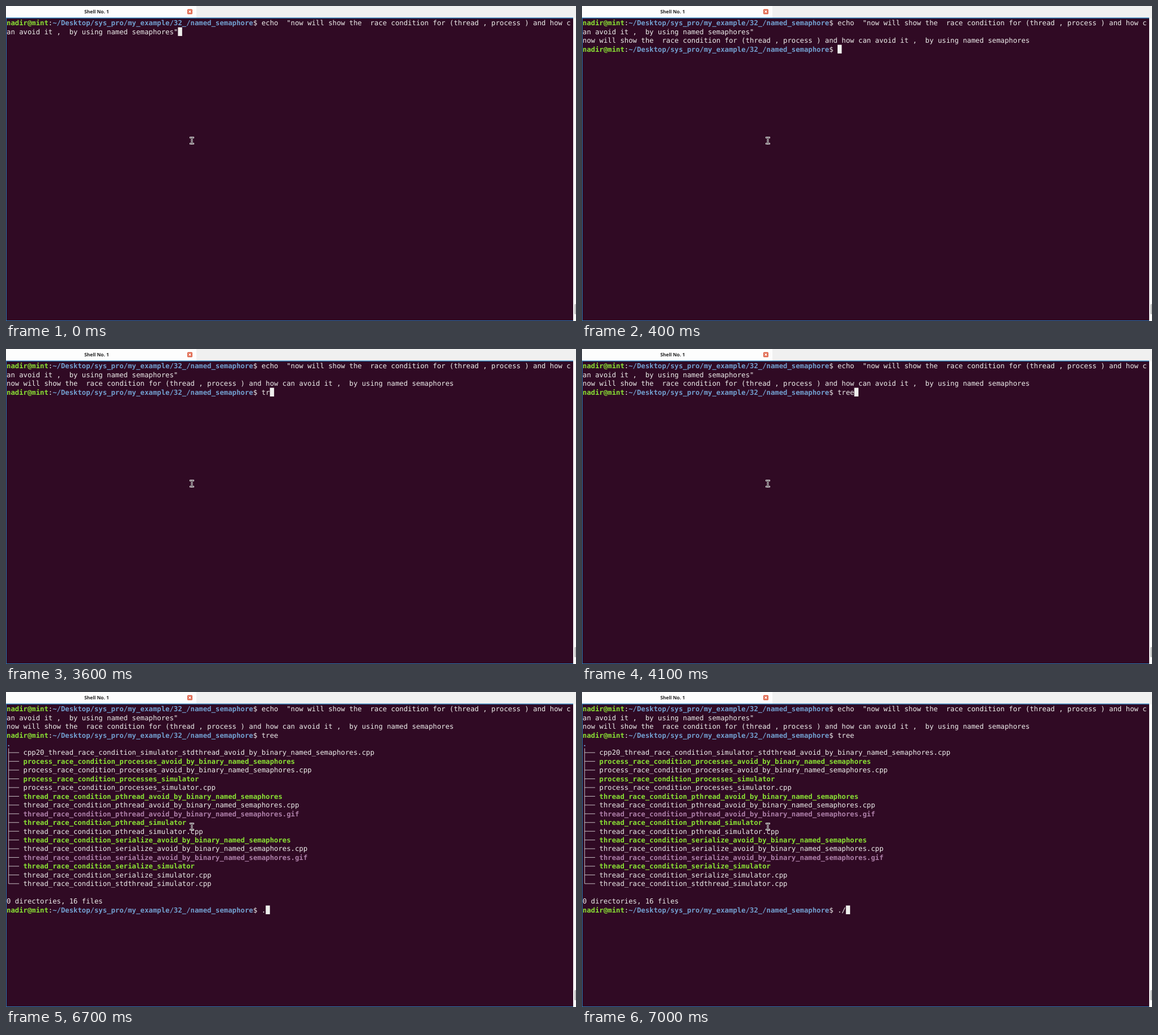
These frames come from a looping animation (1006x557 px, 8 s). An HTML page:

```html
<!DOCTYPE html>
<html lang="en">
<head>
<meta charset="utf-8">
<title>Shell No. 1</title>
<style>
  html, body { margin: 0; width: 100%; height: 100%; overflow: hidden; background: #f0f0f0; }
  svg { display: block; width: 1006px; height: 557px; }
  text { white-space: pre; text-rendering: geometricPrecision; }
  #term { font: 12.253px "DejaVu Sans Mono", monospace; fill: #eeeeec; }
  .g, .b, .m { font-weight: bold; }
  .g { fill: #8ae234; }
  .b { fill: #729fcf; }
  .m { fill: #ad7fa8; }
  .tab { font: bold 8.4px "Noto Sans", "Open Sans", sans-serif; fill: #222; }
</style>
</head>
<body>
<svg viewBox="0 0 1006 557">
  <rect width="1006" height="557" fill="#f0f0f0"/>
  <rect width="336" height="21" fill="#fdfdfd"/>
  <text class="tab" x="160" y="13" text-anchor="middle">Shell No. 1</text>
  <rect x="320" y="5.5" width="9" height="9" rx="1.5" fill="#e0664c"/>
  <path d="M322.5 8l4 4m0-4l-4 4" stroke="#fff" stroke-width="1.2"/>
  <rect y="20.5" width="1001" height="536.5" fill="#2b78b0"/>
  <rect x="1" y="22" width="1000" height="534" fill="#300a24"/>
  <rect x="1001" y="22" width="5" height="535" fill="#fafafa"/>
  <rect x="1003" y="527" width="4" height="18" rx="1.5" fill="#c4c4c4"/>
  <g id="term"></g>
  <rect id="caret" width="7.4" height="15.4" fill="#eeeeec"/>
  <g fill="none" stroke-linecap="square">
    <path d="M325.5 232.7h1.5l1 1 1-1h1.5M328 233.7v8.6M325.5 243.3h1.5l1-1 1 1h1.5" stroke="#f4f4f4" stroke-width="2.8"/>
    <path d="M325.5 232.7h1.5l1 1 1-1h1.5M328 233.7v8.6M325.5 243.3h1.5l1-1 1 1h1.5" stroke="#1c1018" stroke-width="1"/>
  </g>
</svg>
<script>
const LOOP = 8000, CELL = 7.377, LINE = 15.45, LEFT = 1, TOP = 22.2;
const term = document.getElementById('term');
const caret = document.getElementById('caret');
const colX = col => LEFT + col * CELL;
const rowY = row => TOP + row * LINE;
const span = (cls, s) => `<tspan class="${cls}">${s}</tspan>`;
const text = (row, s, col = 0) => `<text x="${colX(col)}" y="${rowY(row) + 12}">${s}</text>`;

const PROMPT = span('g', 'nadir@mint') + ':' +
  span('b', '~/Desktop/sys_pro/my_example/32_/named_semaphore') + '$ ';
const PROMPT_COLS = 61;
const RACE = 'thread_race_condition_', PROC = 'process_race_condition_processes_';
const AVOID = 'avoid_by_binary_named_semaphores';
const FILES = [
  ['', 'cpp20_thread_race_condition_simulator_stdthread_' + AVOID + '.cpp'],
  ['g', PROC + AVOID],
  ['', PROC + AVOID + '.cpp'],
  ['g', PROC + 'simulator'],
  ['', PROC + 'simulator.cpp'],
  ...['pthread_', 'serialize_'].flatMap(kind => [
    ['g', RACE + kind + AVOID],
    ['', RACE + kind + AVOID + '.cpp'],
    ['m', RACE + kind + AVOID + '.gif'],
    ['g', RACE + kind + 'simulator'],
    ['', RACE + kind + 'simulator.cpp']
  ]),
  ['', RACE + 'stdthread_simulator.cpp']
];

function treeLines() {
  const x = colX(0.5), mid = i => rowY(5.5 + i);
  const arms = FILES.map((_, i) => `M${x} ${mid(i)}H${colX(3)}`).join('');
  return `<path d="M${x} ${rowY(5)}V${mid(FILES.length - 1)}${arms}" stroke="#d8d4d6" stroke-width=".9" fill="none"/>`;
}

// Each block of output appears at its time
const blocks = [
  [0, text(0, PROMPT + 'echo  "now will show the  race condition for (thread , process ) and how c') +
      text(1, 'an avoid it ,  by using named semaphores"')],
  [400, text(2, 'now will show the  race condition for (thread , process ) and how can avoid it ,  by using named semaphores') +
        text(3, PROMPT)],
  [5700, text(4, span('b', '.')) + treeLines() +
         FILES.map(([cls, name], i) => text(5 + i, span(cls, name), 4)).join('') +
         text(22, '0 directories, 16 files') + text(23, PROMPT)]
];
// Typed commands: row, text, time of each key
const typed = [
  [3, 'tree', [2900, 3600, 3800, 4100]],
  [23, './', [6700, 7000]]
];

term.innerHTML = blocks.map(b => `<g>${b[1]}</g>`).join('') +
  typed.map(([row]) => text(row, '', PROMPT_COLS)).join('');
const groups = [...term.children];

function draw(t) {
  blocks.forEach(([start], i) => groups[i].style.display = t >= start ? '' : 'none');
  const counts = typed.map(([, s, keys], i) => {
    const n = keys.filter(k => t >= k).length;
    groups[blocks.length + i].textContent = s.slice(0, n);
    return n;
  });
  const [row, col] = t < 400 ? [1, 41]
    : t < 5700 ? [3, PROMPT_COLS + counts[0]]
    : [23, PROMPT_COLS + counts[1]];
  caret.setAttribute('x', colX(col));
  caret.setAttribute('y', rowY(row));
}

const begin = performance.now();
function tick() {
  draw((performance.now() - begin) % LOOP);
  requestAnimationFrame(tick);
}
tick();
</script>
</body>
</html>
```
